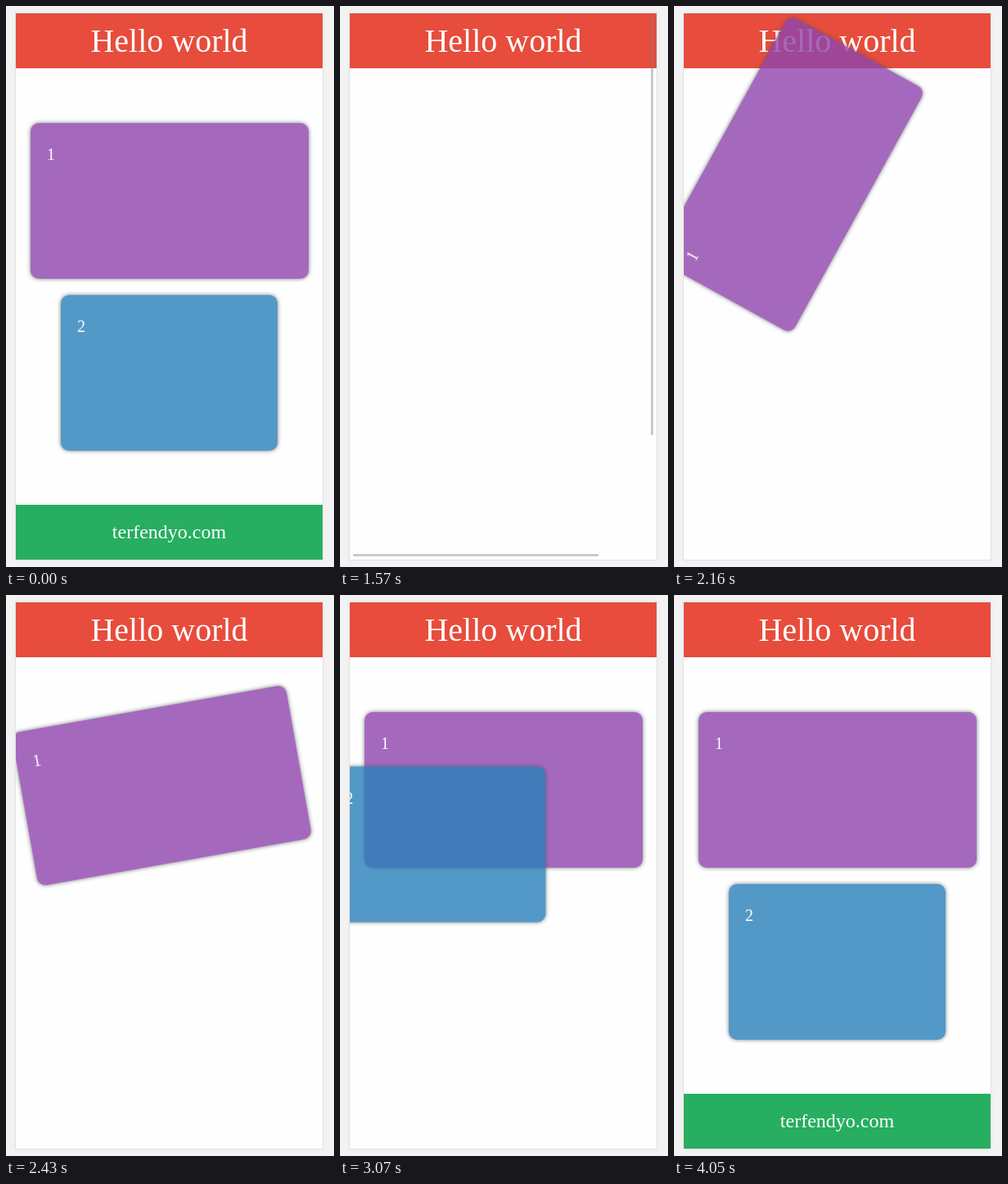
These frames come from a looping animation (401x685 px, 5480 ms). An HTML page:

```html
<!DOCTYPE html>
<html lang="en">
<head>
<meta charset="utf-8">
<title>Hello world</title>
<style>
  html, body {
    margin: 0;
    width: 100%;
    height: 100%;
    overflow: hidden;
    background: #f3f3f3;
  }

  .page {
    position: absolute;
    left: 12px;
    top: 9px;
    width: 375px;
    height: 667px;
    overflow: hidden;
    background: #fefefe;
    color: #fff;
    font-family: "Liberation Serif", "Times New Roman", serif;
  }

  .edge {
    position: absolute;
    left: 12px;
    top: 9px;
    width: 375px;
    height: 667px;
    box-shadow: 0 0 0 1px #e2e2e2, 0 0 8px rgba(0, 0, 0, .05);
  }

  .page > * {
    position: absolute;
    box-sizing: border-box;
    animation: 5.48s infinite;
  }

  header, footer {
    left: 0;
    width: 100%;
    height: 67px;
    line-height: 67px;
    text-align: center;
  }

  header {
    top: 0;
    background: #e74c3c;
    font-size: 40px;
    animation-name: header-slide, header-show !important;
  }

  footer {
    bottom: 0;
    background: #27ae60;
    font-size: 24px;
  }

  .page > header { animation-name: header-slide, header-show; }
  .page > footer { animation-name: footer-slide; }

  .card {
    height: 190px;
    padding: 27px 20px;
    border-radius: 10px;
    box-shadow: 0 0 5px #555;
    opacity: .8;
    font-size: 20px;
    line-height: 23px;
  }

  .page > .spin {
    left: 18px;
    top: 134px;
    width: 340px;
    background: #8e44ad;
    animation-name: spin-in;
  }

  .page > .drop {
    left: 55px;
    top: 344px;
    width: 265px;
    background: #2980b9;
    animation-name: drop-in;
  }

  .bar {
    border-radius: 1px;
    background: #808080;
    opacity: 0;
  }

  .page > .bar { animation-name: bar-fade; }
  .across { left: 4px; top: 660px; width: 300px; height: 3px; }
  .down { left: 368px; top: 4px; width: 3px; height: 511px; }

  /* Each part rests, leaves at 600 ms, then eases back in at its own time. */
  @keyframes header-slide {
    0% { transform: none; animation-timing-function: step-end; }
    10.949%, 12.591% { transform: translateX(-100%); animation-timing-function: ease; }
    21.898%, 100% { transform: none; }
  }

  @keyframes header-show {
    0% { opacity: 1; animation-timing-function: step-end; }
    10.949% { opacity: 0; animation-timing-function: step-end; }
    15.876%, 100% { opacity: 1; }
  }

  @keyframes spin-in {
    0% { transform: none; animation-timing-function: step-end; }
    10.949% { transform: translate(-300%, -300%); animation-timing-function: step-end; }
    29.288% { transform: translate(-100%, -100%) rotate(-360deg); animation-timing-function: ease; }
    48.449%, 100% { transform: translate(0, 0) rotate(0deg); }
  }

  @keyframes drop-in {
    0% { transform: none; animation-timing-function: step-end; }
    10.949%, 47.792% { transform: translate(-375px, -667px); animation-timing-function: ease; }
    64.872%, 100% { transform: none; }
  }

  @keyframes footer-slide {
    0% { transform: none; animation-timing-function: step-end; }
    10.949%, 64.197% { transform: translateX(-100%); animation-timing-function: ease; }
    73.412%, 100% { transform: none; }
  }

  @keyframes bar-fade {
    0% { opacity: 0; animation-timing-function: step-end; }
    15.876% { opacity: .5; animation-timing-function: step-end; }
    28.65% { opacity: .41; animation-timing-function: step-end; }
    30.292% { opacity: .36; animation-timing-function: linear; }
    34.124%, 100% { opacity: 0; }
  }
</style>
</head>
<body>
  <div class="edge"></div>
  <main class="page">
    <header>Hello world</header>
    <div class="card spin">1</div>
    <div class="card drop">2</div>
    <footer>terfendyo.com</footer>
    <div class="bar across"></div>
    <div class="bar down"></div>
  </main>
</body>
</html>
```
